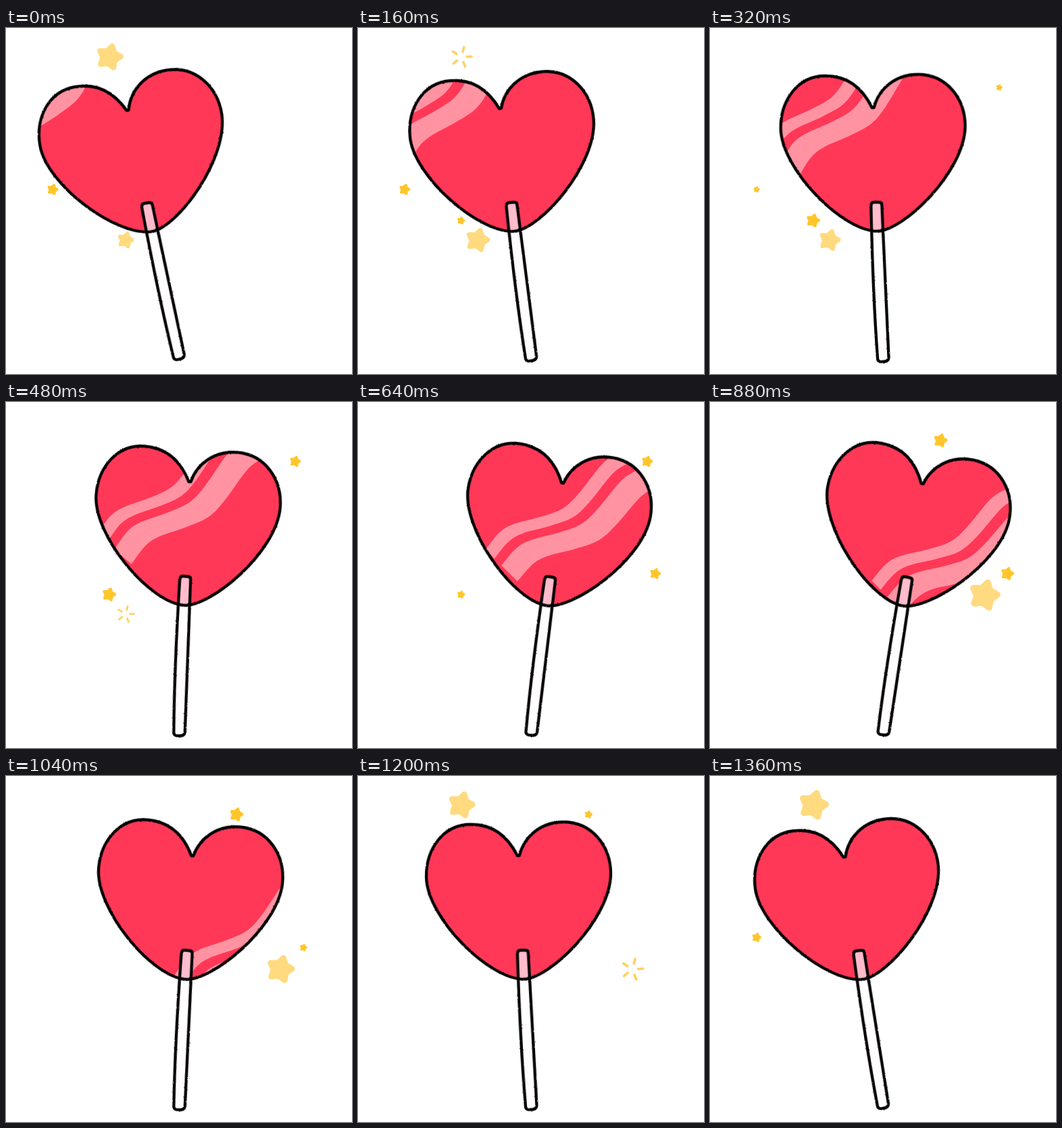
An HTML page for the animation above (1.44 s loop, 512 by 512 pixels).

```html
<!DOCTYPE html>
<html lang="en">
<head>
<meta charset="utf-8">
<title>Heart lollipop</title>
<style>
  html, body { margin: 0; width: 100%; height: 100%; overflow: hidden; background: #fff; }
  svg { display: block; width: 100vw; height: 100vh; }
  .ink { fill: none; stroke: #000; stroke-width: 4.3; stroke-linejoin: round; }
</style>
</head>
<body>
<svg viewBox="0 0 512 512">
  <defs>
    <path id="heart" d="M240 118C227 91 205 71 171 71C131 71 105 106 105 148C105 208 196 301 248 301C287 300 377 213 378 146C378 104 350 69 308 69C275 69 250 90 243 118Z"/>
    <path id="stick" d="M238.500 264Q238.500 258 243 258H250Q254.500 258 254.500 262Q260.500 405 264.500 488Q264 494 256 494Q248 495 248 489Q241 393 238.500 264Z"/>
    <clipPath id="inHeart"><use href="#heart"/></clipPath>
    <filter id="rough" filterUnits="userSpaceOnUse" x="0" y="0" width="512" height="512" color-interpolation-filters="sRGB">
      <feTurbulence type="fractalNoise" baseFrequency="0.3" numOctaves="2" seed="4"/>
      <feDisplacementMap in="SourceGraphic" scale="2" xChannelSelector="R" yChannelSelector="G"/>
    </filter>
  </defs>
  <g id="stars"></g>
  <g id="pop">
    <use href="#stick" fill="#fffdfd"/>
    <use href="#heart" fill="#ff3857"/>
    <g clip-path="url(#inHeart)">
      <path id="shine" fill="#ff93a2"/>
      <use href="#stick" fill="#ffbccb"/>
    </g>
    <g class="ink" filter="url(#rough)">
      <use href="#heart"/>
      <use href="#stick"/>
    </g>
  </g>
</svg>
<script>
const STEP = 80, STEPS = 18, TILT = -75;
const WAVE = [[77, 182], [93, 154], [112, 138], [149, 121], [180, 103], [200, 77], [226, 30], [244, 12]];
// x, y, largest radius, first step
const STARS = [
  [153, 43, 23, 14], [177, 314, 18.5, 0], [406, 286, 24, 9],
  [69, 239, 9, 16], [152.5, 285, 11, 2], [428, 88, 9, 4], [440, 254, 10.5, 7], [341, 57, 11, 9]
];
const $ = id => document.getElementById(id);

// Smooth curve through points, as cubic segments
function curve(p) {
  let d = `${p[0]}`;
  for (let i = 0; i < p.length - 1; i++) {
    const b = p[i], c = p[i + 1], a = p[i - 1] || b, e = p[i + 2] || c;
    const out = b.map((v, k) => v + (c[k] - a[k]) / 6);
    const into = c.map((v, k) => v - (e[k] - b[k]) / 6);
    d += `C${out} ${into} ${c}`;
  }
  return d;
}

// The wave moved down to the right, opening a little towards its top
const edge = t => WAVE.map(([x, y]) => [x + t * (17 + (182 - y) * .02), y + t * 12]);
const band = (from, to) => `M${curve(edge(from))}L${curve(edge(to).reverse())}Z`;
$('shine').setAttribute('d', band(0, .9) + band(1.6, 3.2));

function polar(x, y, r, deg) {
  const a = deg * Math.PI / 180;
  return [x + r * Math.cos(a), y + r * Math.sin(a)].map(v => v.toFixed(2));
}

function star(x, y, r, color) {
  const pts = Array.from({ length: 10 }, (_, i) => polar(x, y, r * (i % 2 ? .47 : .81), TILT + i * 36));
  return `<polygon points="${pts.join(' ')}" fill="${color}" stroke="${color}" stroke-width="${r * .4}" stroke-linejoin="round"/>`;
}

function burst(x, y, r, late) {
  const from = r * (late ? .56 : .36), to = r * .66;
  let d = '';
  for (let a = TILT; a < TILT + 360; a += 72) d += `M${polar(x, y, from, a)}L${polar(x, y, to, a)}`;
  return `<path d="${d}" stroke="#ffd060" stroke-width="${r * (late ? .1 : .15)}" stroke-linecap="round"/>`;
}

// Each star swells and shrinks; the big ones end in a burst
function drawStar([x, y, r, first], n) {
  const big = r > 15, life = big ? 6 : 7;
  const age = (n - first + STEPS) % STEPS;
  if (age < life) {
    const size = 1 - .05 * (age - (life - 1) / 2) ** 2;
    return star(x, y, r * size, big ? '#ffda7f' : '#ffc62c');
  }
  return big && age < life + 2 ? burst(x, y, r, age > life) : '';
}

function draw(n) {
  // Steady swing: ten steps to the right, eight back
  const angle = 11.8 - 23.6 * (n < 10 ? 1 - n / 10 : (n - 10) / 8);
  const lift = .05 * angle - .023 * angle * angle;
  $('pop').setAttribute('transform', `translate(0 ${lift}) rotate(${angle + 2.3} 256 492)`);
  $('shine').setAttribute('transform', `translate(${17 * (n - 4)} ${13 * (n - 4)})`);
  $('stars').innerHTML = STARS.map(s => drawStar(s, n)).join('');
}

let shown = 0;
const start = performance.now();
function tick(now) {
  const n = Math.floor(Math.max(0, now - start) / STEP) % STEPS;
  if (n !== shown) draw(shown = n);
  requestAnimationFrame(tick);
}
draw(shown);
requestAnimationFrame(tick);
</script>
</body>
</html>
```
